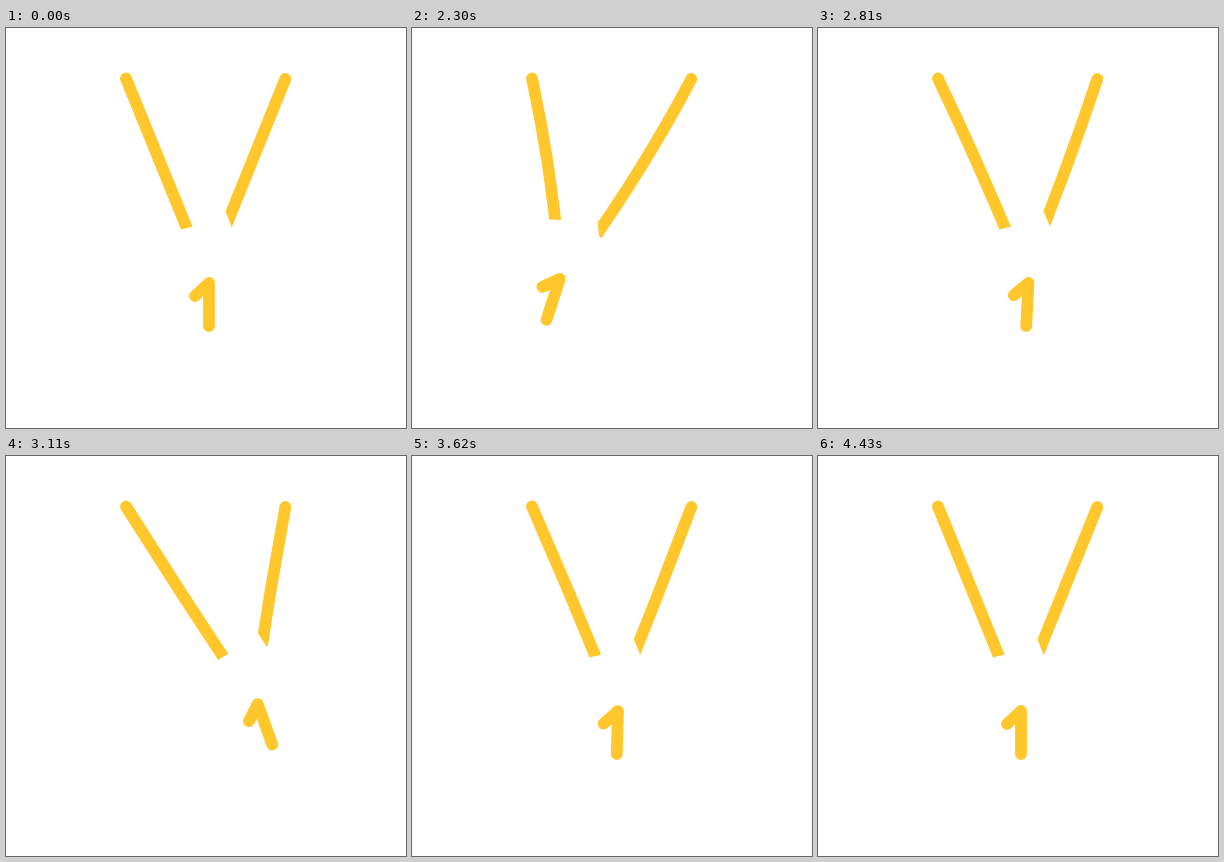
Animation of 400x400 px, one loop 4520 ms. Source, as an HTML page:

```html
<!DOCTYPE html>
<html lang="en">
<head>
<meta charset="utf-8">
<title>Medal</title>
<style>
html, body { margin: 0; width: 100%; height: 100%; overflow: hidden; background: #fff; }
svg { display: block; width: 100%; height: 100%; }
path { fill: none; stroke: #ffc72c; stroke-width: 11.8; stroke-linecap: round; stroke-linejoin: round; }
#band { stroke: #fff; stroke-width: 84; stroke-linecap: butt; }
</style>
</head>
<body>
<svg viewBox="0 0 400 400">
  <path id="right"/>
  <path id="band"/>
  <path id="left"/>
  <g id="medal">
    <circle r="78.5" fill="#fff"/>
    <path d="M-11.5 -8L2.5 -21V22"/>
  </g>
</svg>
<script>
const LOOP = 4520, REST = 2000, STEP = 30, STEPS = 81;
const CENTER = { x: 200.5, y: 276 };
// Turning points of the swing: step, sideways offset
const TURNS = [[0, 0], [19.5, -72], [33.7, 72], [46.8, -36], [59, 24], [70, -8], [STEPS, 0]];
const get = id => document.getElementById(id);
const [right, band, left, medal] = ['right', 'band', 'left', 'medal'].map(get);

const pull = u => 1 - (1 - u ** 1.2) ** 3.25;
const swing = u => (1 - Math.cos(Math.PI * u)) / 2;

// Pulled aside first, then released to swing out
function offset(step) {
  if (step <= 0 || step >= STEPS) return 0;
  const i = TURNS.findIndex(p => p[0] > step);
  const [s0, x0] = TURNS[i - 1], [s1, x1] = TURNS[i];
  const ease = i === 1 ? pull : swing;
  return x0 + (x1 - x0) * ease((step - s0) / (s1 - s0));
}

function strap(x0, y0, x1, y1, bow) {
  return `M${x0} ${y0}Q${(x0 + x1) / 2 + bow} ${(y0 + y1) / 2} ${x1} ${y1}`;
}

function draw(t) {
  const step = Math.min(STEPS, Math.max(0, Math.floor((t - REST) / STEP)));
  const dx = offset(step);
  const before = step < STEPS ? offset(step - 1) : 0;
  const speed = dx - before;
  const tilt = -0.31 * before; // the tilt trails one step behind
  const x = CENTER.x + dx, y = CENTER.y - 0.0185 * tilt * tilt;
  const r = tilt * Math.PI / 180, cos = Math.cos(r), sin = Math.sin(r);
  const at = (px, py) => [x + px * cos - py * sin, y + px * sin + py * cos];

  const [lx, ly] = at(-7.5, -46), [rx, ry] = at(6.5, -46);
  const lag = -0.15 * speed, bow = 0.2 * speed, sag = Math.max(0, -dx) / 10;
  const slip = 0.0017 * dx * dx - 0.05 * dx;
  const l = strap(120, 50.5, lx + lag, ly, bow + sag);
  left.setAttribute('d', l);
  band.setAttribute('d', l);
  right.setAttribute('d', strap(279.3, 51, rx + slip + lag, ry, bow + sag * 1.5));
  medal.setAttribute('transform', `translate(${x} ${y}) rotate(${tilt})`);
}

const begin = performance.now();
function tick() {
  draw((performance.now() - begin) % LOOP);
  requestAnimationFrame(tick);
}
draw(0);
requestAnimationFrame(tick);
</script>
</body>
</html>
```
